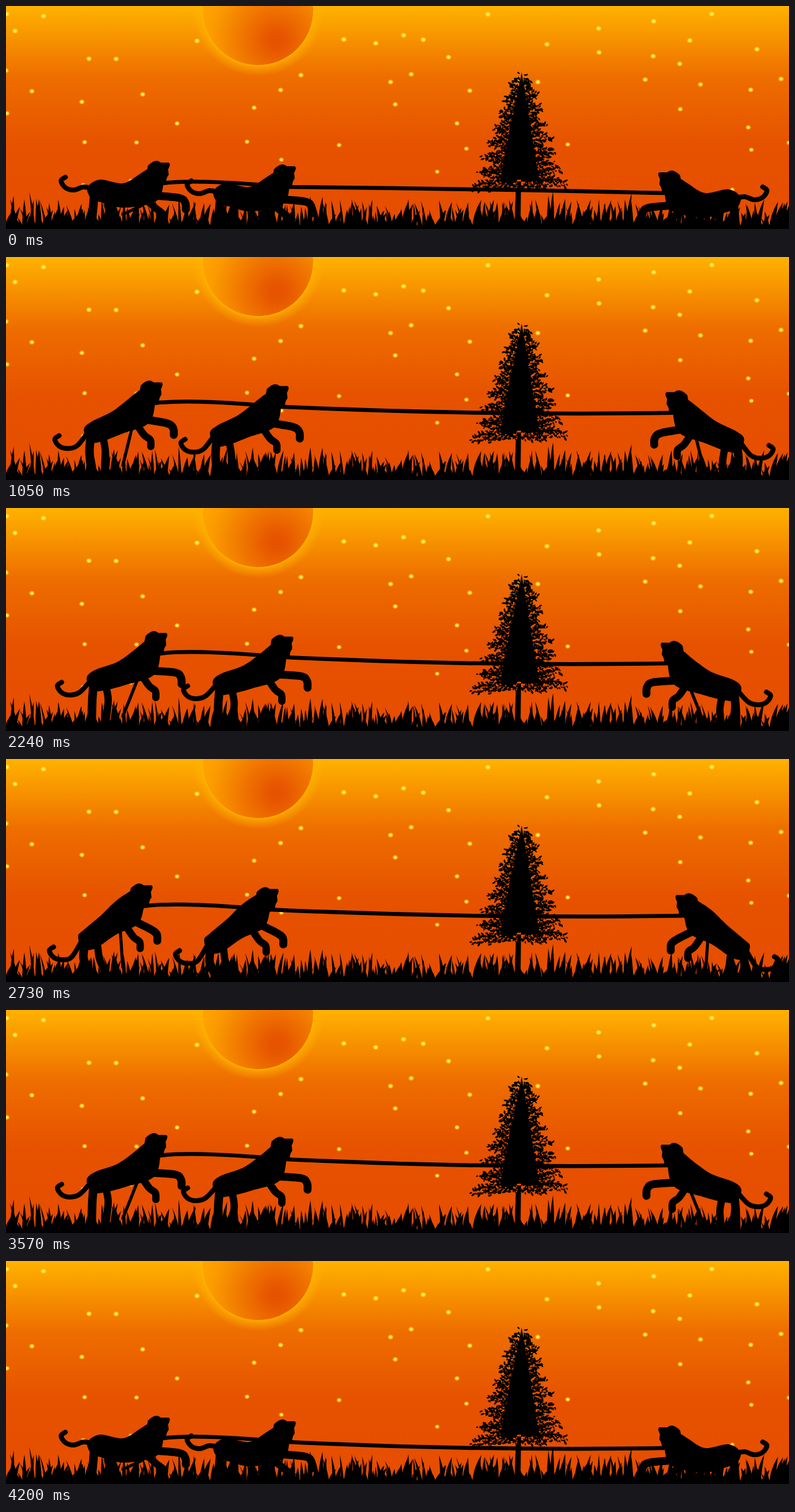
These frames come from a looping animation (1280x366 px, 4270 ms). An HTML page:

```html
<!DOCTYPE html>
<html lang="en">
<head>
<meta charset="utf-8">
<title>Tug of war at sunset</title>
<style>
html, body { margin: 0; width: 100%; height: 100%; overflow: hidden; background: #e65100; }
svg { display: block; width: 100%; height: 100%; }
.limb { fill: none; stroke: #000; stroke-linecap: round; stroke-linejoin: round; }
#stars { animation: blink 1400ms step-end infinite; }
@keyframes blink { 35% { visibility: hidden; } 50% { visibility: visible; } }
</style>
</head>
<body>
<svg viewBox="0 0 1280 366" preserveAspectRatio="none">
  <defs>
    <linearGradient id="sky" x1="0" y1="0" x2="0" y2="1">
      <stop offset="0" stop-color="#ffb200"/>
      <stop offset=".32" stop-color="#ee6d00"/>
      <stop offset=".62" stop-color="#e65200"/>
      <stop offset="1" stop-color="#e64c00"/>
    </linearGradient>
    <radialGradient id="moon" gradientUnits="userSpaceOnUse" cx="443" cy="57" r="125">
      <stop offset="0" stop-color="#e65100"/>
      <stop offset=".12" stop-color="#e75600"/>
      <stop offset=".85" stop-color="#fb9b00"/>
      <stop offset="1" stop-color="#ffa200"/>
    </radialGradient>
    <radialGradient id="glow" gradientUnits="userSpaceOnUse" cx="412" cy="7" r="108">
      <stop offset=".82" stop-color="#ffb300"/>
      <stop offset=".88" stop-color="#ffb300" stop-opacity=".5"/>
      <stop offset="1" stop-color="#ffb300" stop-opacity="0"/>
    </radialGradient>
    <radialGradient id="star">
      <stop offset=".42" stop-color="#ffe94f"/>
      <stop offset=".6" stop-color="#ffd22e" stop-opacity=".55"/>
      <stop offset="1" stop-color="#ffb300" stop-opacity="0"/>
    </radialGradient>
    <g id="cat">
      <path id="torso"/>
      <path id="near" class="limb" stroke-width="13"/>
      <path id="far" class="limb" stroke-width="12"/>
      <path id="tail" class="limb" stroke-width="8"/>
      <path id="hindA" class="limb" stroke-width="14"/>
      <path id="hindB" class="limb" stroke-width="12"/>
      <path id="head" d="M-14 8Q-6 0 0 0Q4 0 7 3H20Q24 5 19 14L20 23Q16 28 16 34L9 38Q7 44 3 42Q-8 46-18 30Z"/>
    </g>
    <path id="shank" class="limb" stroke-width="5"/>
  </defs>
  <rect width="1280" height="366" fill="url(#sky)"/>
  <g id="stars" fill="url(#star)"></g>
  <circle cx="412" cy="7" r="108" fill="url(#glow)"/>
  <circle cx="412" cy="7" r="90" fill="url(#moon)"/>
  <path id="tree"/>
  <path id="rope" class="limb" stroke-width="6.5"/>
  <use href="#cat"/><use href="#shank"/>
  <use href="#cat" transform="translate(206 6)"/>
  <g transform="matrix(-1 0 0 1 1334 16)"><use href="#cat"/><use href="#shank"/></g>
  <path id="grass"/>
</svg>
<script>
const LOOP = 4270, STEP = 70;
const el = id => document.getElementById(id);
const setPath = (id, d) => el(id).setAttribute('d', d);
const add = ([x, y], dx, dy) => [x + dx, y + dy];
const mix = (a, b, k) => [a[0] + (b[0] - a[0]) * k, a[1] + (b[1] - a[1]) * k];
const fmt = p => p.map(v => v.toFixed(1)).join(' ');

let seed = 11;
const rand = (lo = 0, hi = 1) => {
  seed = (seed * 16807) % 2147483647;
  return lo + (hi - lo) * seed / 2147483647;
};

// Catmull-Rom curve through a list of points
function spline(pts, closed = false) {
  const n = pts.length;
  const at = i => pts[closed ? (i + n) % n : Math.max(0, Math.min(n - 1, i))];
  let d = 'M' + fmt(pts[0]);
  for (let i = 0; i < (closed ? n : n - 1); i++) {
    const [a, b, c, e] = [at(i - 1), at(i), at(i + 1), at(i + 2)];
    const out = add(b, (c[0] - a[0]) / 6, (c[1] - a[1]) / 6);
    const into = add(c, (b[0] - e[0]) / 6, (b[1] - e[1]) / 6);
    d += `C${fmt(out)} ${fmt(into)} ${fmt(c)}`;
  }
  return d;
}

// Outline around a spine of [point, radius] pairs
function flesh(spine) {
  const left = [], right = [];
  spine.forEach(([p, r], i) => {
    const [a] = spine[Math.max(0, i - 1)], [b] = spine[Math.min(spine.length - 1, i + 1)];
    const dx = b[0] - a[0], dy = b[1] - a[1], k = r / Math.hypot(dx, dy);
    left.push(add(p, dy * k, -dx * k));
    right.unshift(add(p, -dy * k, dx * k));
  });
  return spline([...left, ...right], true);
}

function drawStars() {
  const placed = [];
  while (placed.length < 58) {
    const x = rand(0, 1280), y = 12 + 290 * rand() ** 1.4;
    if (placed.every(p => Math.hypot(p[0] - x, p[1] - y) > 30)) placed.push([x, y]);
  }
  el('stars').innerHTML = placed.map(([x, y]) => {
    const r = 6.2 - y / 200;
    return `<ellipse cx="${x}" cy="${y}" rx="${r}" ry="${r * .9}"/>`;
  }).join('');
}

function leaf(p, angle, len) {
  const c = Math.cos(angle) * len, s = Math.sin(angle) * len;
  const bulge = k => fmt([c * .5 - s * k, s * .5 + c * k]);
  return `M${fmt(p)}q${bulge(.45)} ${fmt([c, s])}q${fmt([-c * .5 + s * .45, -s * .5 - c * .45])} ${fmt([-c, -s])}Z`;
}

function drawTree() {
  const top = 109, axis = 839;
  const reach = y => Math.min(4 + (y - top) * .8, 20 + .37 * (y - 130));
  let d = `M843 ${top}L807 288H872ZM831 366L834 285H842L841 366Z`;
  for (let y = top + 4; y < 296; y += 2.4) {
    for (const side of [-1, 1]) {
      const length = reach(y) * (.8 + .2 * Math.sin(y * .27 + side)) * rand(.82, 1.08);
      for (let along = 3; along < length; along += 3.2) {
        const p = [axis + 4 * (290 - y) / 180 + side * along, y + along * .12 + rand(-3, 3)];
        d += leaf(p, (side < 0 ? Math.PI : 0) + rand(-1.3, 1.3), rand(4, 8));
      }
    }
  }
  setPath('tree', d);
}

function drawGrass() {
  let d = 'M0 360H1280V366H0Z';
  for (let x = -4; x < 1286; x += rand(1.8, 4.4)) {
    const tip = 350 - 33 * rand() - 20 * rand() ** 12;
    const lean = rand(-12, 12), w = rand(2.6, 4.4), mid = (tip + 366) / 2;
    d += `M${fmt([x - w, 367])}Q${fmt([x - w, mid])} ${fmt([x + lean, tip])}` +
      `Q${fmt([x + w + lean * .3, mid])} ${fmt([x + w, 367])}Z`;
  }
  setPath('grass', d);
}

// Joints of the left cat; everything else follows from them
const crouch = { hip: [152, 303], chest: [232, 298], ear: [246, 254],
  near: [294, 334], far: [257, 352], tail: [97, 281] };
const rising = { hip: [152, 287], chest: [232, 270], ear: [250, 218],
  near: [298, 303], far: [256, 336], tail: [97, 281] };
const lunge = { hip: [151, 283], chest: [225, 254], ear: [242, 202],
  near: [287, 289], far: [245, 311], tail: [91, 286] };
const rear = { hip: [133, 299], chest: [190, 251], ear: [211, 205],
  near: [236, 301], far: [212, 311], tail: [74, 315] };

const KEYS = [
  [0, crouch], [560, rising], [910, lunge], [1470, rear], [2240, lunge],
  [2870, rear], [3570, lunge], [4200, crouch], [LOOP, crouch]
];

function poseAt(t) {
  const i = KEYS.findIndex(key => key[0] > t);
  const [t0, a] = KEYS[i - 1], [t1, b] = KEYS[i];
  const pose = {};
  for (const joint in a) pose[joint] = mix(a[joint], b[joint], (t - t0) / (t1 - t0));
  return pose;
}

const foreleg = (from, paw) => spline([from, add(paw, -11, -19), add(paw, -1, -11), paw]);

function drawCat({ hip, chest, ear, near, far, tail }) {
  const waist = add(mix(hip, chest, .5), 0, 12 - .3 * (hip[1] - chest[1]));
  const neck = add(mix(chest, ear, .5), 5, 0);
  setPath('torso', flesh([[add(hip, -15, 6), 11], [hip, 18], [waist, 20],
    [chest, 26], [neck, 16], [add(ear, 2, 14), 8]]));
  setPath('near', foreleg(add(chest, 9, 13), near));
  setPath('far', foreleg(add(chest, -4, 19), far));
  setPath('hindA', spline([add(hip, -8, 8), add(hip, -10, 33), [140, 355]]));
  setPath('hindB', spline([add(hip, 13, 13), add(hip, 16, 33), [163, 353]]));
  setPath('shank', spline([add(chest, -11, 30), [191, 342]]));
  setPath('tail', spline([tail, add(tail, -7, 6), add(tail, 0, 17), add(tail, 14, 21),
    add(tail, 30, 16), add(hip, -10, -3)]));
  el('head').setAttribute('transform', `translate(${ear})`);
}

function drawRope(ear, t) {
  const a = add(ear, 10, 37), b = add(a, 206, 6), end = [1334 - a[0], a[1] + 16];
  const sag = Math.min(10, t / 90 - 2);
  setPath('rope', `M${fmt(a)}C${fmt(add(a, 45, -6))} ${fmt(add(a, 120, -1))} ${fmt(b)}` +
    `Q${fmt(add(mix(b, end, .5), 0, sag))} ${fmt(end)}`);
}

drawStars();
drawTree();
drawGrass();

const blink = el('stars').getAnimations()[0];
const start = performance.now();
function tick() {
  const elapsed = (performance.now() - start) % LOOP;
  const t = Math.floor(elapsed / STEP) * STEP;
  const pose = poseAt(t);
  drawCat(pose);
  drawRope(pose.ear, t);
  blink.currentTime = t;
  requestAnimationFrame(tick);
}
tick();
</script>
</body>
</html>
```
